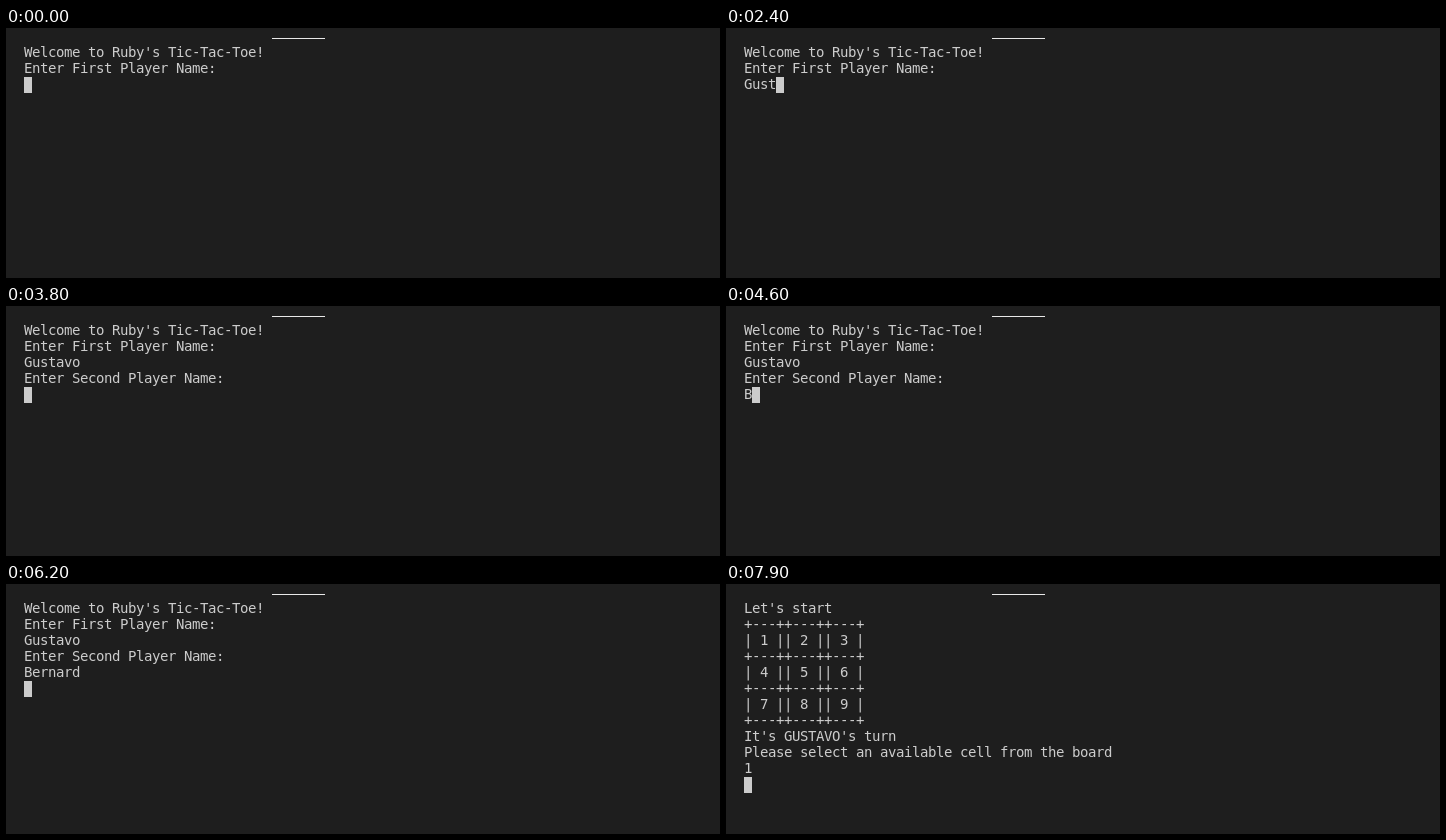
Animation of 714x250 px, one loop 8 s. Source, as an HTML page:

```html
<!DOCTYPE html>
<html lang="en">
<head>
<meta charset="utf-8">
<title>Tic-Tac-Toe terminal</title>
<style>
  html, body { margin: 0; width: 100%; height: 100%; overflow: hidden; background: #1e1e1e; }
  #rule { position: absolute; left: 266px; top: 10px; width: 53px; height: 1px; background: #e8e8e8; }
  #screen {
    position: absolute; left: 18px; top: 16px; margin: 0;
    font: 14px/16px "DejaVu Sans Mono", monospace;
    letter-spacing: calc(8px - 1ch);
    font-variant-ligatures: none;
    color: #ccc; white-space: pre;
  }
  #cursor { position: absolute; left: 18px; top: 17px; width: 8px; height: 16px; background: #ccc; }
</style>
</head>
<body>
<div id="rule"></div>
<pre id="screen"></pre>
<div id="cursor"></div>
<script>
const LOOP = 8000, CELL_W = 8, CELL_H = 16;
const first = "Gustavo", second = "Bernard";

const askFirst = "Welcome to Ruby's Tic-Tac-Toe!\nEnter First Player Name:\n";
const askSecond = `${askFirst}${first}\nEnter Second Player Name:\n`;

const edge = "+---++---++---+\n";
const row = n => `| ${n} || ${n + 1} || ${n + 2} |\n`;
const board = "Let's start\n" + edge + [1, 4, 7].map(n => row(n) + edge).join("") +
  `It's ${first.toUpperCase()}'s turn\nPlease select an available cell from the board\n`;

// Each step: start time, text on screen; the cursor follows the last character.
const typed = (prompt, name, keys) =>
  keys.map(([time, count]) => [time, prompt + name.slice(0, count)]);

const steps = [
  [0, askFirst],
  ...typed(askFirst, first,
    [[1100, 1], [1500, 2], [2100, 3], [2400, 4], [2600, 5], [2800, 6], [3300, 7]]),
  [3800, askSecond],
  ...typed(askSecond, second,
    [[4600, 1], [4800, 2], [5200, 4], [5400, 5], [5600, 6], [5900, 7]]),
  [6200, `${askSecond}${second}\n`],
  [6500, board],
  [7600, board + "1"],
  [7900, board + "1\n"]
];

const screenEl = document.getElementById("screen");
const cursorEl = document.getElementById("cursor");
let shown = null;

function draw(time) {
  const text = steps.findLast(([start]) => start <= time)[1];
  if (text === shown) return;
  shown = text;
  screenEl.textContent = text;
  const lines = text.split("\n");
  const x = lines.at(-1).length * CELL_W, y = (lines.length - 1) * CELL_H;
  cursorEl.style.transform = `translate(${x}px, ${y}px)`;
}

const origin = performance.now();
function tick() {
  draw((performance.now() - origin) % LOOP);
  requestAnimationFrame(tick);
}
draw(0);
requestAnimationFrame(tick);
</script>
</body>
</html>
```
